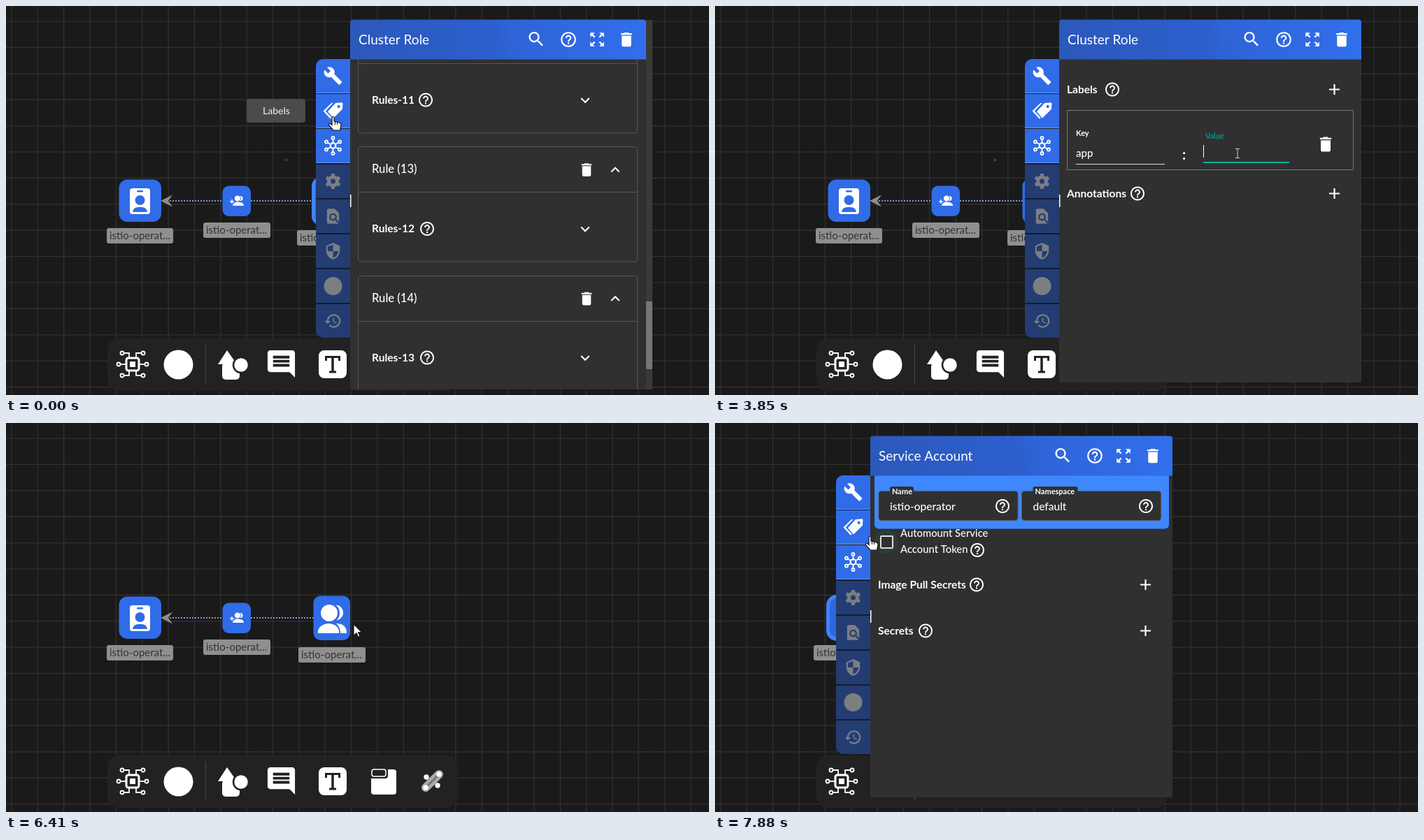
These frames come from a looping animation (1005 by 557 pixels, 8000 ms). An HTML page with a canvas:

```html
<!DOCTYPE html>
<html lang="en">
<head>
<meta charset="utf-8">
<title>Cluster designer</title>
<style>
html, body { margin: 0; width: 100%; height: 100%; overflow: hidden; background: #1a1a1a; }
canvas { display: block; }
</style>
</head>
<body>
<canvas id="stage" width="1005" height="557"></canvas>
<script>
const ctx = document.getElementById('stage').getContext('2d');
const LOOP = 8000, TAU = Math.PI * 2;
const BLUE = '#306ce8', BODY = '#303030', WHITE = '#fff', TEAL = '#00b39f', BAR = '#222', DIM = '#7b7f82';

const ICONS = {
  wrench: 'M22.7 19l-9.1-9.1c.9-2.3.4-5-1.5-6.9-2-2-5-2.4-7.4-1.3L9 6 6 9 1.6 4.7C.4 7.1.9 10.1 2.9 12.1c1.9 1.9 4.6 2.4 6.9 1.5l9.1 9.1c.4.4 1 .4 1.4 0l2.3-2.3c.5-.4.5-1.1.1-1.4z',
  tag: 'M15 2.500L22.500 2q1.500 0 1.500 1.500L23.500 10 12.500 21 5.500 13zM19 5a1.8 1.8 0 1 0 .01 0zM12 2.500H10L0 12.500 9 22l1.500-1.500L2.800 12.500z',
  search: 'M15.5 14h-.79l-.28-.27C15.41 12.59 16 11.11 16 9.5 16 5.91 13.09 3 9.5 3S3 5.91 3 9.5 5.91 16 9.5 16c1.61 0 3.09-.59 4.23-1.57l.27.28v.79l5 4.99L20.49 19zM9.5 14C7.01 14 5 11.99 5 9.5S7.01 5 9.5 5 14 7.01 14 9.5 11.99 14 9.5 14z',
  help: 'M11 18h2v-2h-2zM12 2a10 10 0 1 0 .01 0zM12 20a8 8 0 1 1 .01 0zM12 6c-2.21 0-4 1.79-4 4h2c0-1.1.9-2 2-2s2 .9 2 2c0 2-3 1.75-3 5h2c0-2.25 3-2.5 3-5 0-2.21-1.79-4-4-4z',
  expand: 'M15 3l2.3 2.3-2.89 2.87 1.42 1.42L18.7 6.7 21 9V3zM3 9l2.3-2.3 2.87 2.89 1.42-1.42L6.7 5.3 9 3H3zm6 12l-2.3-2.3 2.89-2.87-1.42-1.42L5.3 17.3 3 15v6zm12-6l-2.3 2.3-2.87-2.89-1.42 1.42 2.89 2.87L15 21h6z',
  trash: 'M6 19c0 1.1.9 2 2 2h8c1.1 0 2-.9 2-2V7H6zM19 4h-3.5l-1-1h-5l-1 1H5v2h14z',
  down: 'M16.59 8.59L12 13.17 7.41 8.59 6 10l6 6 6-6z',
  up: 'M12 8l-6 6 1.41 1.41L12 10.83l4.59 4.58L18 14z',
  plus: 'M19 13h-6v6h-2v-6H5v-2h6V5h2v6h6z',
  find: 'M20 19.59V8l-6-6H6c-1.1 0-2 .9-2 2v16c0 1.1.9 2 2 2h12c.45 0 .85-.15 1.19-.4l-4.43-4.43A5 5 0 1 1 16.17 15.75zM12 10a3 3 0 1 0 .01 0z',
  shield: 'M12 1L3 5v6c0 5.55 3.84 10.74 9 12 5.16-1.26 9-6.45 9-12V5zM12 12h7c-.53 4.12-3.28 7.79-7 8.94V12H5V6.3l7-3.11z',
  history: 'M13 3c-4.97 0-9 4.03-9 9H1l4 4 4-4H6a7 7 0 1 1 2.06 4.94l-1.42 1.42A9 9 0 1 0 13 3zM12 8v5l4.28 2.54.72-1.21-3.5-2.08V8z',
  chat: 'M22 4c0-1.1-.9-2-2-2H4c-1.1 0-2 .9-2 2v12c0 1.1.9 2 2 2h14l4 4zM18 14H6v-2h12zM18 11H6V9h12zM18 8H6V6h12z',
  arrow: 'M0 0V16.5L4 12.8 6.5 18.5 9 17.4 6.6 11.8H11.8z',
  hand: 'M0 1.5Q1.5-1 3 1.5V7l8 2q2.5 1 2 4l-1.5 7H2L-4.5 12.5q0-3 2.5-2L0 12.5z'
};
for (const name in ICONS) ICONS[name] = new Path2D(ICONS[name]);

function box(x, y, w, h, r, fill, stroke, width = 1) {
  ctx.beginPath();
  ctx.roundRect(x, y, w, h, r);
  if (fill) { ctx.fillStyle = fill; ctx.fill(); }
  if (stroke) { ctx.strokeStyle = stroke; ctx.lineWidth = width; ctx.stroke(); }
}
function disc(x, y, r, fill, stroke, width = 2) {
  box(x - r, y - r, 2 * r, 2 * r, r, fill, stroke, width);
}
function line(points, color, width = 1) {
  ctx.beginPath();
  for (let i = 0; i < points.length; i += 2) ctx.lineTo(points[i], points[i + 1]);
  ctx.strokeStyle = color;
  ctx.lineWidth = width;
  ctx.stroke();
}
function shape(d, fill) {
  ctx.fillStyle = fill;
  ctx.fill(new Path2D(d));
}
function text(s, x, y, size = 15, color = WHITE, weight = 500) {
  ctx.font = `${weight} ${size}px Lato, sans-serif`;
  ctx.fillStyle = color;
  ctx.fillText(s, x, y + size * .36);
}
function icon(name, x, y, size = 26, color = WHITE) {
  ctx.save();
  ctx.translate(x - size / 2, y - size / 2);
  ctx.scale(size / 24, size / 24);
  ctx.fillStyle = color;
  ctx.fill(ICONS[name], 'evenodd');
  ctx.restore();
}
function spokes(x, y, from, to, width, color) {
  for (let i = 0; i < 6; i++) {
    const a = i * TAU / 6 + TAU / 12, c = Math.cos(a), s = Math.sin(a);
    line([x + c * from, y + s * from, x + c * to, y + s * to], color, width);
  }
}
const clamp = v => Math.max(0, Math.min(1, v));
const ease = v => { v = clamp(v); return v * v * (3 - 2 * v); };

function grid() {
  for (let i = 0; i < 27; i++) {
    const x = 8 + i * 37.35, y = 22 + i * 37.4;
    line([x, 0, x, 557], '#323232', 1.2);
    line([0, y, 1005, y], '#323232', 1.2);
  }
}

function nodeLabel(s, x, y, w) {
  box(x, y, w, 22, 3, '#8f8f8f');
  text(s, x + 4, y + 11, 15, '#333', 400);
}
function node(x, y, w, h, r, selected) {
  if (selected) {
    box(x - 3, y - 3, w + 6, h + 6, r + 3, '#3f83ff');
    box(x + 2, y + 2, w - 4, h - 4, r - 2, '#2f68dd');
  } else box(x - .5, y - .5, w + .5, h + .5, r, BLUE);
}
function graph(accountOn, roleOn) {
  ctx.setLineDash([2, 2]);
  line([440, 279, 234, 279], '#7d97dc', 2);
  ctx.setLineDash([]);
  ctx.save();
  ctx.translate(accountOn ? 3 : 0, 0);
  shape('M221 279L238 270.5 232 279 238 287.5z', '#8c8c8c');
  ctx.restore();

  node(162, 249, 60, 60, 12, accountOn);
  box(177, 261, 29, 37, 4, WHITE);
  box(187, 264, 9, 2.5, 1, BLUE);
  disc(191.5, 278, 7, BLUE);
  shape('M181 295Q182 287 191.5 288 201 287 202 295z', BLUE);
  if (accountOn) nodeLabel('istio-operator', 141, 318, 101);
  else nodeLabel('istio-operat...', 144, 318, 95);

  node(310, 258, 40, 43, 9);
  line([320, 280, 326, 280], WHITE, 1.5);
  line([323, 277, 323, 283], WHITE, 1.5);
  disc(335, 275.5, 3.5, WHITE);
  disc(331, 275.5, 4.5, WHITE, BLUE, 1);
  shape('M333 281Q340 281 340 286H333z', WHITE);
  shape('M324 286Q325 280.5 331 280.5 336.5 280.5 337 286z', WHITE);
  nodeLabel('istio-operat...', 282, 310, 96);

  node(440, 248, 52, 63, 10, roleOn);
  disc(471, 271.5, 11, WHITE);
  disc(462, 272, 13.5, WHITE, BLUE, 3);
  shape('M472 287Q487 287 487 301H478Q478 292 472 287z', WHITE);
  shape('M446 301V297Q449 288 461 287 474 288 476 297V301z', WHITE);
  nodeLabel('istio-operat...', roleOn ? 416 : 418, 321, 96);
}

function toolbar() {
  box(145, 476, 501, 75, 16, BAR);
  for (const s of [-1, 1]) {
    line([181 + s * 10, 513, 181 + s * 17, 513], WHITE, 1.8);
    disc(181 + s * 20, 513, 2.5, null, WHITE, 1.8);
    for (const v of [-1, 1]) {
      line([181 + s * 5, 513 + v * 10, 181 + s * 5, 513 + v * 16, 181 + s * 12, 513 + v * 16], WHITE, 1.8);
      disc(181 + s * 15, 513 + v * 16, 2.5, null, WHITE, 1.8);
    }
  }
  box(172, 504, 18, 18, 3, BAR, WHITE, 3);
  box(177, 509, 8, 8, 1, WHITE);
  disc(246.5, 513.5, 21, WHITE);
  line([285.5, 485, 285.5, 541], '#484848');
  shape('M316 493L330 513H303z', WHITE);
  box(309, 511, 25, 24, 5, WHITE);
  disc(336, 514, 11, WHITE, BAR, 2.5);
  icon('chat', 393.5, 512.5, 47);
  box(447, 493, 40, 40, 8, WHITE);
  line([457.5, 508, 457.5, 502.5, 476.5, 502.5, 476.5, 508], BAR, 3);
  line([467, 502, 467, 524], BAR, 3.5);
  line([462, 524, 472, 524], BAR, 3);
  box(522, 496, 36, 36, 4, WHITE);
  box(520, 493, 26, 16, 4, BAR);
  box(523, 496, 20, 10, 3, BAR, WHITE, 1.5);
  ctx.lineCap = 'round';
  line([600, 522, 619, 503], '#aaa', 12);
  line([600, 522, 619, 503], '#777', 3);
  ctx.lineCap = 'butt';
  for (const [x, y] of [[600, 522], [619, 503], [601, 507], [617, 519]]) disc(x, y, 3.7, WHITE);
}

function sidebar(dx, dy) {
  ctx.save();
  ctx.translate(dx, dy);
  box(443, 76, 49, 398, [10, 0, 0, 10], '#141c2c');
  for (let i = 0; i < 8; i++) {
    const y = Math.round(76 + i * 50.2), cy = y + 24, on = i < 3;
    box(443, y, 49, 48, [i ? 0 : 10, 0, 0, i < 7 ? 0 : 10], on ? BLUE : '#233d72');
    if (on) line([443, y + 48.5, 492, y + 48.5], '#6f97ef');
    const name = ['wrench', 'tag', '', '', 'find', 'shield', '', 'history'][i];
    if (name) icon(name, 467.5, cy, on ? 28 : 26, on ? WHITE : DIM);
    if (i === 2) {
      spokes(467.5, cy, 3, 9, 1.8, WHITE);
      disc(467.5, cy, 3.8, BLUE, WHITE, 2.2);
      for (let k = 0; k < 6; k++) {
        const a = k * TAU / 6 + TAU / 12;
        disc(467.5 + Math.cos(a) * 11, cy + Math.sin(a) * 11, 2, BLUE, WHITE, 1.8);
      }
    }
    if (i === 3) {
      disc(467.5, cy, 6, null, DIM, 5);
      spokes(467.5, cy, 6, 11, 5, DIM);
    }
    if (i === 6) disc(467.5, cy, 13, DIM);
  }
  ctx.restore();
}

function header(x, y, w, title) {
  const g = ctx.createLinearGradient(x, y + 60, x + w, y);
  g.addColorStop(0, '#2b58bb');
  g.addColorStop(.5, '#2d5fcd');
  g.addColorStop(.55, '#2f64d8');
  g.addColorStop(1, '#316feb');
  box(x, y - .5, w, 57, [4, 4, 0, 0], g);
  text(title, x + 12, y + 28, 19, WHITE, 400);
  icon('search', x + w - 157, y + 27.5, 28);
  icon('help', x + w - 111, y + 28);
  icon('expand', x + w - 70, y + 28);
  icon('trash', x + w - 28, y + 28, 27);
}
function handle(x, y) { box(x, y, 1.5, 18, 0, WHITE); }
function heading(s, x, y, helpX, plusX) {
  text(s, x, y, 15.5, WHITE, 700);
  icon('help', helpX, y + .5, 24);
  if (plusX) icon('plus', plusX, y + .5);
}

function rulesPanel() {
  box(492, 20, 432, 529, 3, BODY);
  ctx.save();
  ctx.beginPath();
  ctx.rect(492, 20, 423, 529);
  ctx.clip();
  [17, 201.5, 386].forEach((y, i) => {
    box(503.5, Math.floor(y) + .5, 399, 164.5, 3, null, '#565656');
    line([504, Math.floor(y) + 65.5, 903, Math.floor(y) + 65.5], '#565656');
    text(`Rule (${12 + i})`, 523, y + 32, 16.6);
    icon('trash', 830, y + 33, 25);
    icon('up', 871, y + 33);
    heading(`Rules-${11 + i}`, 523, y + 117, i ? 602 : 600);
    icon('down', 828, y + 118);
  });
  ctx.restore();
  header(492, 20, 423, 'Cluster Role');
  box(915, 20, 9, 529, 0, '#3a3a3a');
  box(915, 423, 9, 97, 0, '#757575');
  handle(492, 270);
}

function field(label, value, x, y, w, focused, dx) {
  const raised = focused || value;
  if (raised) text(label, x + dx, y - (dx ? 37 : 44), 11, focused ? TEAL : WHITE, focused ? 400 : 700);
  else text(label, x, y - 15, 15);
  text(value, x, y - 15, 15);
  box(x, y, w, focused ? 2 : 1, 0, focused ? TEAL : '#ddd');
  if (focused && !value) line([x + .5, y - 24, x + .5, y - 6], WHITE);
}
function labelsPanel(t) {
  const hasRow = t >= 1540;
  box(492, 20, 432, 519, 3, BODY);
  header(492, 20, 432, 'Cluster Role');
  if (t > 1380 && t < 2150) disc(886, 120, 27 * ease((t - 1340) / 150), '#424242');
  heading('Labels', 503, 119, 568, 885.5);
  heading('Annotations', 503, hasRow ? 268 : 182, 604, 885.5);
  if (hasRow) {
    box(503.5, 149.5, 409, 85, 0, null, '#777');
    const typedKey = 'app'.slice(0, (t >= 2370) + (t >= 2510) + (t >= 2790));
    const typed = 'middleware'.slice(0, Math.max(0, Math.floor((t - 3930) / 65)));
    field('Key', typedKey, 516, 226, 127, t >= 1900 && t < 3580, 0);
    field('Value', typed, 698, 223, 123, t >= 3580, 3);
    text(':', 668, 213, 20, WHITE, 700);
    icon('trash', 873, 198, 28);
  }
  handle(492, 270);
}

function accountPanel(t) {
  box(222, 19, 432, 517, 3, BODY);
  box(228, 75, 421, 76.5, [0, 0, 6, 6], '#3e87fc');
  header(222, 19, 432, 'Service Account');
  if (t < 7600) {
    ctx.setLineDash([28, 12]);
    ctx.lineDashOffset = -(t - 7190) / 4;
    disc(438, 321, 40, null, TEAL, 7);
    ctx.setLineDash([]);
    return;
  }
  [[234, 'Name', 34, 'istio-operator', 411], [438.5, 'Namespace', 64, 'default', 616]].forEach(([x, label, w, value, helpX]) => {
    box(x, 97.5, 199, 42, 4, BODY, '#555');
    box(x + 16, 91, w, 13, 3, BODY);
    text(label, x + 19, 98, 11, WHITE, 700);
    text(value, x + 16, 119, 15.5);
    icon('help', helpX, 119, 24);
  });
  disc(245, 170, 17, '#2c3d39');
  box(237, 162, 17, 17, 1, BODY, '#ddd', 2);
  text('Automount Service', 265, 158, 14.8);
  text('Account Token', 265, 181, 14.8);
  icon('help', 375, 182, 24);
  heading('Image Pull Secrets', 233, 231, 374, 615.5);
  heading('Secrets', 233, 297, 301, 615.5);
  handle(222, 268);
}

function scaled(x, y, scale, alpha, draw) {
  ctx.save();
  ctx.globalAlpha = alpha;
  ctx.translate(x, y);
  ctx.scale(scale, scale);
  ctx.translate(-x, -y);
  draw();
  ctx.restore();
}

// time, x, y of the pointer hotspot
const PATH = [
  [0, 466, 158], [300, 466, 158], [1200, 880, 58], [1400, 885, 115], [1600, 885, 115], [1940, 614, 202],
  [2900, 614, 202], [3450, 747, 211], [4550, 747, 211], [4850, 868, 236], [5050, 941, 228], [5640, 941, 228],
  [5880, 880, 158], [6410, 497, 288], [6560, 497, 288], [6930, 181, 288], [7350, 181, 288], [7860, 220, 162], [8000, 220, 162]
];
function pointer(t) {
  const i = PATH.findIndex(p => p[0] > t), [t0, x0, y0] = PATH[i - 1], [t1, x1, y1] = PATH[i];
  const k = ease((t - t0) / (t1 - t0)), x = x0 + (x1 - x0) * k, y = y0 + (y1 - y0) * k;
  if (t > 1800 && t < 4700) {
    line([x, y - 6, x, y + 6], '#ccc');
    line([x - 3, y - 6.5, x + 3, y - 6.5], '#ccc');
    line([x - 3, y + 6.5, x + 3, y + 6.5], '#ccc');
    return;
  }
  const hand = t < 420 || (t > 1360 && t < 1660) || t > 6860;
  ctx.save();
  ctx.translate(x, y);
  ctx.fillStyle = WHITE;
  ctx.strokeStyle = '#111';
  ctx.lineWidth = 1.2;
  const p = hand ? ICONS.hand : ICONS.arrow;
  ctx.fill(p);
  ctx.stroke(p);
  if (hand) for (const fx of [4.5, 7.5]) line([fx, 8, fx, 12], '#111');
  ctx.restore();
}

function draw(t) {
  ctx.fillStyle = '#1a1a1a';
  ctx.fillRect(0, 0, 1005, 557);
  const closing = t >= 5610 && t < 5870, opening = t >= 7190 && t < 7600;
  if (!closing && !opening) grid();
  if (t < 5610) disc(400.5, 220.5, 2, t < 280 ? '#2f3d66' : '#444');
  graph(t >= 7000, t < 280);
  toolbar();
  if (t < 5610) {
    sidebar(0, 0);
    if (t < 280) rulesPanel(); else labelsPanel(t);
    if (t < 420) {
      box(344, 133, 84, 34, 4, '#4b4b4b');
      text('Labels', 367, 150, 14, '#e6e6e6');
    }
  } else if (closing) {
    const k = ease((t - 5610) / 260);
    scaled(492, 279, 1 - .7 * k, 1 - k, () => labelsPanel(t));
  } else if (t >= 7190) {
    const k = ease((t - 7335) / 140);
    if (t >= 7600) sidebar(-270, -1);
    scaled(222, 277.5, .31 + .69 * k, .5 + .5 * k, () => accountPanel(t));
  }
  pointer(t);
}

function tick() {
  draw(performance.now() % LOOP);
  requestAnimationFrame(tick);
}
tick();
</script>
</body>
</html>
```
